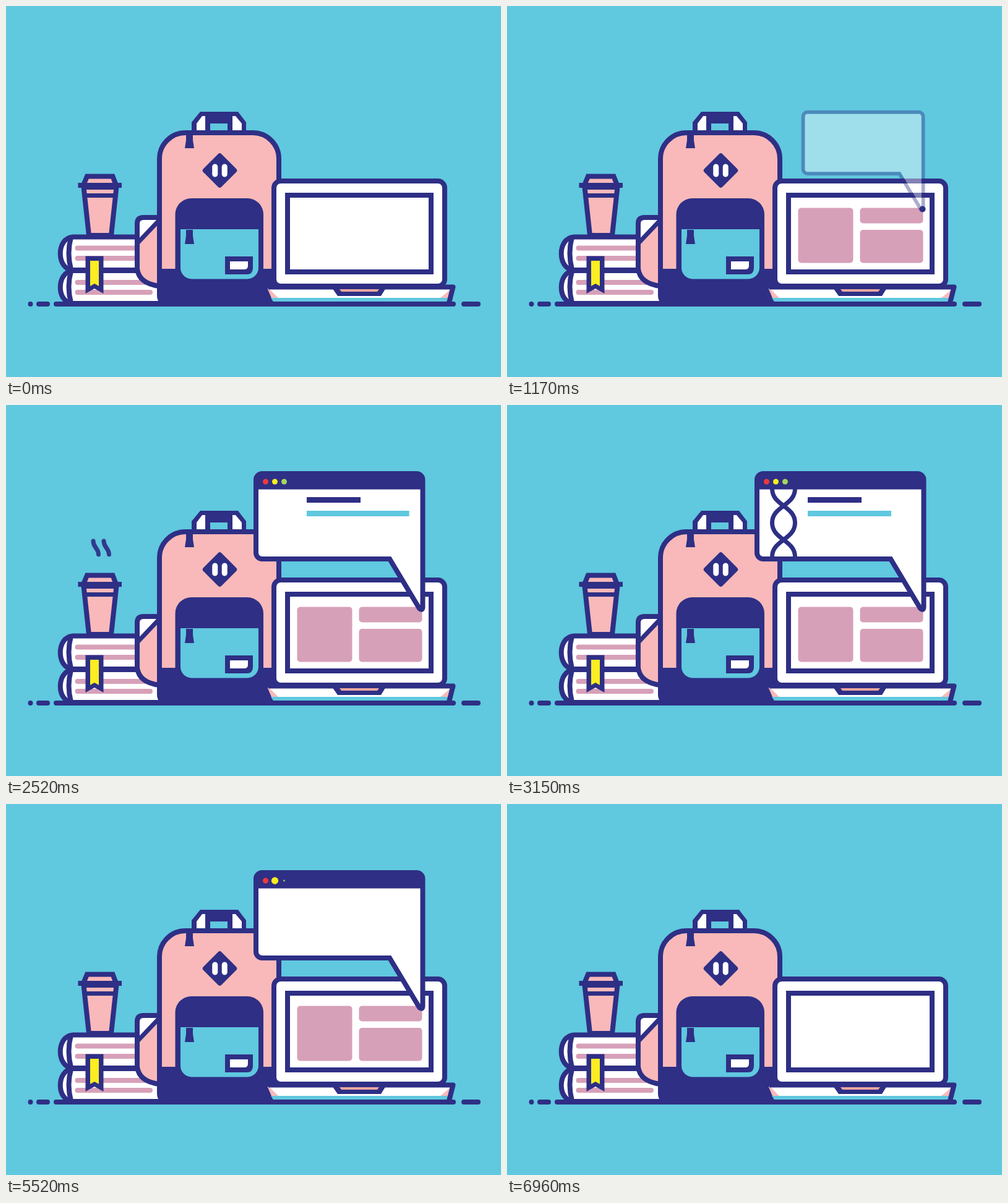
An HTML page that plays this animation: 800x600 px, repeating every 7.5 s.

```html
<!DOCTYPE html>
<html lang="en">
<head>
<meta charset="utf-8">
<title>Study desk</title>
<style>
  html, body { margin: 0; width: 100%; height: 100%; overflow: hidden; background: #60c8df; }
  svg { display: block; width: 100%; height: 100%; }
  .navy { fill: #2e2f85; }
  .pink { fill: #f9b9ba; }
  .mauve { fill: #d7a0b9; }
  .cyan { fill: #60c8df; }
  .white { fill: #fff; }
  .yellow { fill: #fbed21; }
  .line { stroke: #2e2f85; stroke-width: 8; }
  .thin { stroke-width: 7; }
  .open { fill: none; }
  .round { stroke-linecap: round; }
  .pages { stroke: #d7a0b9; stroke-width: 8; stroke-linecap: round; }
</style>
</head>
<body>
<svg viewBox="0 0 800 600">
  <defs>
    <path id="bubbleShape" d="M414 111H663.500A10 10 0 0 1 673.500 121V327Q673 333.500 668 329L620 249H414A10 10 0 0 1 404 239V121A10 10 0 0 1 414 111Z"/>
    <clipPath id="bubbleClip"><use href="#bubbleShape"/></clipPath>
    <clipPath id="helixClip"><rect id="helixWipe" x="420" y="135" width="56" height="0"/></clipPath>
    <path id="zipper" class="navy" d="M2 0H13V10L15 23H0L2 10Z"/>
  </defs>

  <!-- ground -->
  <path class="line open round" d="M39.5 482h.01M53 482H67M81 482H723M740 482H763"/>

  <!-- books -->
  <g class="line white">
    <path d="M250 428H108C81 430 81 480 108 481H250Z"/>
    <path d="M250 373.500H108C81 375 81 426 108 427H250Z"/>
    <path class="open" d="M105 374Q98 400 105 426M105 429Q98 454 105 480"/>
  </g>
  <path class="pages" d="M115.500 391.500H230M115.500 408H230M115.500 447H233M115.500 463H233"/>
  <path class="navy" d="M128.500 404.500H157.500V465L143 457L128.500 465Z"/>
  <path class="yellow" d="M136 412H150V453L143 449L136 453Z"/>

  <!-- cup -->
  <g class="line pink">
    <path d="M125.500 293H178.500L170 371H134Z"/>
    <path d="M131 275.500H172.500L178 290H125Z"/>
    <path class="open thin" d="M126 306.500H177"/>
    <path class="open" d="M116.500 290H187"/>
  </g>

  <!-- steam -->
  <g id="steam" class="line thin open round" opacity=".92">
    <path pathLength="1" d="M141 264C141 253 149.500 253 149.500 242S141 231 141 220"/>
    <path pathLength="1" d="M158 264C158 253 166.500 253 166.500 242S158 231 158 220"/>
  </g>

  <!-- backpack -->
  <path class="white" d="M248 342H222Q212 342 212 352V390L248 350Z"/>
  <path class="pink" d="M248 346L212 384V425Q215 449 248 453Z"/>
  <path class="line open" d="M248 342H222Q212 342 212 352V425Q215 449 248 453"/>
  <path class="line thin open" d="M212 384L248 346"/>
  <path class="navy" d="M300 206V188L314 171H375L388 188V206Z"/>
  <path class="white" d="M308 202V190L317 178H322V202ZM366 202V178H371L381 190V202Z"/>
  <path class="cyan" d="M330 190H358V202H330Z"/>
  <path class="line pink" d="M248 468V247A42 42 0 0 1 290 205H399A42 42 0 0 1 441 247V478H258Q248 478 248 468Z"/>
  <path class="navy" d="M246 425H443V482H258Q246 482 246 470Z"/>
  <use href="#zipper" x="289" y="207"/>
  <rect class="navy" x="324.750" y="245.250" width="41.500" height="41.500" rx="4" transform="rotate(45 345.500 266)"/>
  <path class="open round" stroke="#fff" stroke-width="9" d="M337.750 260V272M353.250 260V272"/>
  <path class="navy" d="M273.500 430V337A26 26 0 0 1 299.500 311H390A26 26 0 0 1 416 337V430Z"/>
  <path class="cyan" d="M282 361H408V423A18 18 0 0 1 390 441.500H300A18 18 0 0 1 282 423Z"/>
  <use href="#zipper" x="289" y="362"/>
  <path class="navy" d="M354 405H399V424Q399 434 389 434H354Z"/>
  <path class="white" d="M362 413H391V420Q391 426 385 426H362Z"/>

  <!-- laptop -->
  <rect class="line white" x="433" y="283" width="276" height="170" rx="11"/>
  <rect class="line white" x="455" y="306" width="232" height="124"/>
  <path class="white" d="M423 457H722L716 478H432Z"/>
  <path class="pink" d="M423 458H426L440 472H429ZM722 458H719L702 472H718Z"/>
  <path class="cyan" d="M428 472H719L716 478H432Z"/>
  <path class="line open" stroke-linejoin="round" d="M424 454.500H722.500L716 480"/>
  <path class="navy" d="M527 456H614L606 469H536Z"/>
  <path fill="#eba79f" d="M539 458H603L600 462H542Z"/>
  <g id="blocks" class="mauve">
    <rect x="470.500" y="326.500" width="89" height="89" rx="5"/>
    <rect x="570.500" y="326.500" width="102" height="25" rx="5"/>
    <rect x="570.500" y="362" width="102" height="53.500" rx="5"/>
  </g>

  <!-- speech bubble -->
  <circle id="anchor" class="navy" cx="671.500" cy="328.500"/>
  <g id="bubble">
    <use href="#bubbleShape" class="white"/>
    <g clip-path="url(#bubbleClip)">
      <rect id="titleBar" class="navy" x="404" y="111" width="270" height="0"/>
    </g>
    <g id="lights">
      <circle cx="419.500" cy="124" fill="#ee3a3f"/>
      <circle cx="434.500" cy="124" fill="#fbed21"/>
      <circle cx="449.500" cy="124" fill="#a5d65c"/>
    </g>
    <g class="line thin open" clip-path="url(#helixClip)">
      <path d="M428.500 135.500c0 27 37 28 37 55s-37 28-37 55M465.500 135.500c0 27-37 28-37 55s37 28 37 55"/>
    </g>
    <rect id="heading" class="navy" x="486" y="149" height="9"/>
    <rect id="subline" class="cyan" x="486" y="171" height="9"/>
    <use href="#bubbleShape" class="line open"/>
  </g>
</svg>
<script>
const LOOP = 7500;
const $ = id => document.getElementById(id);
const clamp = v => Math.min(1, Math.max(0, v));
const ramp = (t, from, to) => clamp((t - from) / (to - from));
const ease = p => p * p * (3 - 2 * p);

// Eased value along a list of time, value pairs.
function track(t, ...keys) {
  let value = keys[1];
  for (let i = 2; i < keys.length; i += 2) {
    value += (keys[i + 1] - keys[i - 1]) * ease(ramp(t, keys[i - 2], keys[i]));
  }
  return value;
}

function drawSteam(t) {
  const age = (t - 50 + 2100) % 2100;
  const head = ramp(age, 0, 240);
  const tail = ramp(age, 250, 490);
  $('steam').style.display = head > tail ? '' : 'none';
  for (const path of $('steam').children) {
    path.style.strokeDasharray = `${head - tail} 3`;
    path.style.strokeDashoffset = -tail;
  }
}

function drawBlocks(t) {
  [...$('blocks').children].forEach((block, i) => {
    const enter = i * 240, leave = 6800 - i * 160;
    const scale = track(t, enter, 0, enter + 80, 1.1, enter + 200, 1,
      leave, 1, leave + 95, 1.1, leave + 160, 0);
    const base = i === 1 ? 351.5 : 415.5;
    block.setAttribute('transform', `translate(0 ${base}) scale(1 ${scale}) translate(0 ${-base})`);
  });
}

function drawBubble(t) {
  const radius = track(t, 765, 0, 840, 7.5, 900, 5, 6390, 5, 6435, 7.5, 6510, 0);
  const scale = track(t, 1080, 0, 1231, 1.105, 1380, 1, 6120, 1, 6230, 1.105, 6380, 0);
  const opacity = track(t, 1080, 0, 1290, 1, 6220, 1, 6380, 0);
  $('anchor').setAttribute('r', radius);
  $('bubble').setAttribute('opacity', opacity);
  $('bubble').setAttribute('transform', `translate(670.5 328) scale(${scale}) translate(-670.5 -328)`);
}

function drawWindow(t) {
  $('titleBar').setAttribute('height',
    track(t, 1500, 0, 1600, 27, 1650, 25.5, 5640, 25.5, 5730, 36, 5850, 0));
  [...$('lights').children].forEach((light, i) => {
    const enter = 1800 + i * 90, leave = 5400 + (2 - i) * 70;
    light.setAttribute('r', track(t, enter, 0, enter + 110, 5.7, enter + 190, 4.5,
      leave, 4.5, leave + 60, 5.7, leave + 150, 0));
  });
  $('heading').setAttribute('width', track(t, 2100, 0, 2340, 87, 3900, 87, 4140, 0));
  $('subline').setAttribute('width', track(t, 2310, 0, 2535, 167.500, 2760, 135, 4080, 135, 4320, 0));
  $('helixWipe').setAttribute('height', track(t, 2700, 0, 3150, 112, 4440, 112, 4680, 0));
}

function draw() {
  const t = performance.now() % LOOP;
  drawSteam(t);
  drawBlocks(t);
  drawBubble(t);
  drawWindow(t);
  requestAnimationFrame(draw);
}
draw();
</script>
</body>
</html>
```
